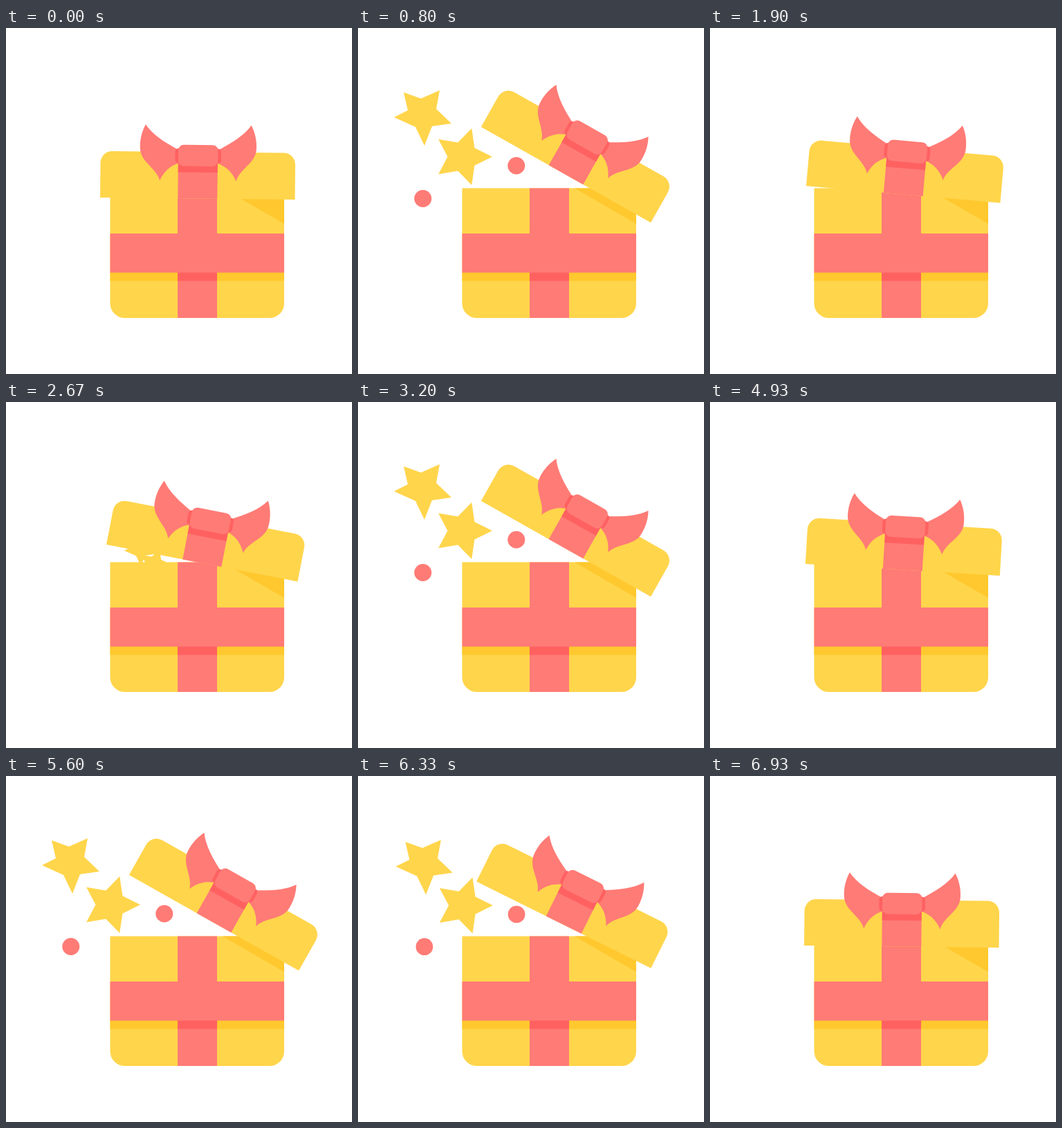
Animation, 500 px wide and 500 px high, one loop 7.16 s. Source, as an HTML page:

```html
<!DOCTYPE html>
<html lang="en">
<head>
<meta charset="utf-8">
<title>Gift box</title>
<style>
  html, body { margin: 0; width: 100%; height: 100%; overflow: hidden; background: #fff; }
  svg { display: block; width: 100vw; height: 100vh; }
  .gold { fill: #ffd54b; }
  .amber { fill: #ffc82e; }
  .pink { fill: #ff7b76; }
  .red { fill: #ff6161; }
</style>
</head>
<body>
<svg viewBox="0 0 500 500">
  <g id="bits"></g>

  <g id="box">
    <path class="gold" d="M150.5 231.5H402V398a21 21 0 0 1-21 21H171.500a21 21 0 0 1-21-21Z"/>
    <path class="amber" d="M313 231.500H402V283ZM150.500 353H402V365.500H150.500Z"/>
    <path class="pink" d="M248 231.500H305V419H248ZM150.500 297H402V353.500H150.500Z"/>
    <path class="red" d="M248 353.500H305V365.500H248Z"/>
  </g>

  <g id="lid">
    <path class="gold" d="M135.700 247.300V197a17 17 0 0 1 17-17H400.200a17 17 0 0 1 17 17V247.300Z"/>
    <path class="pink" d="M248 185H305V247.300H248Z"/>
    <path class="red" d="M248 188H305V209.500H248Z"/>
    <g class="pink">
      <path id="wing" d="M200.400 140.800C211 156 229 167 248 177V196.500C238 200 228 207 221.600 221.800C217 204 194 196 192.800 176C192 163 195 151 200.400 140.800Z"/>
      <use href="#wing" transform="matrix(-1 0 0 1 553.600 0)"/>
    </g>
    <rect class="red" x="243.500" y="175" width="66.500" height="21.500" rx="5"/>
    <rect class="pink" x="248" y="169.800" width="57.500" height="30.700" rx="8"/>
  </g>
</svg>
<script>
const LOOP = 7160, CYCLE = 2400;
const HINGE = '355.5 275.5';
const SHUT = 0.6, OPEN = 29.4;
const MOUTH = [250, 262];
const lid = document.getElementById('lid');
const layer = document.getElementById('bits');

function add(tag, cls, attrs, x, y) {
  const el = document.createElementNS('http://www.w3.org/2000/svg', tag);
  el.setAttribute('class', cls);
  for (const key in attrs) el.setAttribute(key, attrs[key]);
  layer.append(el);
  return { el, x, y };
}

function starPoints(outer, inner) {
  return Array.from({ length: 10 }, (_, i) => {
    const r = i % 2 ? inner : outer, a = i * Math.PI / 5;
    return [r * Math.cos(a), r * Math.sin(a)].map(v => v.toFixed(2)).join();
  }).join(' ');
}

const bits = [
  add('polygon', 'gold', {
    points: '-28,-34 -3,-25 24,-37 19,-10 41,11 13,15 2,43 -11,16 -42,2 -22,-8'
  }, 94, 127),
  add('polygon', 'gold', { points: starPoints(43, 21.5) }, 151, 186),
  add('circle', 'pink', { r: 12.5 }, 228.8, 199),
  add('circle', 'pink', { r: 12.5 }, 93.8, 246.5)
];

// Smooth ramp from 0 to 1 between two times
function ease(t, from, to) {
  const x = Math.min(1, Math.max(0, (t - from) / (to - from)));
  return x * x * (3 - 2 * x);
}

// Hold each pose for its step; the first cycle has an uneven beat
function stepTime(time) {
  const cycle = Math.floor(time / CYCLE), t = time % CYCLE;
  const rest = t % 200, second = cycle ? 70 : 100;
  return t - rest + (rest >= 130 ? 130 : rest >= second ? second : 0);
}

function draw(time) {
  const t = stepTime(time);
  const lift = ease(t, 0, 667) - ease(t, 1397, 2065);
  const fly = ease(t, 0, 667) - ease(t, 1485, 2130);
  lid.setAttribute('transform', `rotate(${SHUT + (OPEN - SHUT) * lift} ${HINGE})`);
  for (const b of bits) {
    const x = MOUTH[0] + (b.x - MOUTH[0]) * fly;
    const y = MOUTH[1] + (b.y - MOUTH[1]) * fly;
    b.el.setAttribute('transform', `translate(${x} ${y}) scale(${0.3 + 0.7 * fly})`);
  }
}

const start = performance.now();
function tick() {
  draw((performance.now() - start) % LOOP);
  requestAnimationFrame(tick);
}
tick();
</script>
</body>
</html>
```
